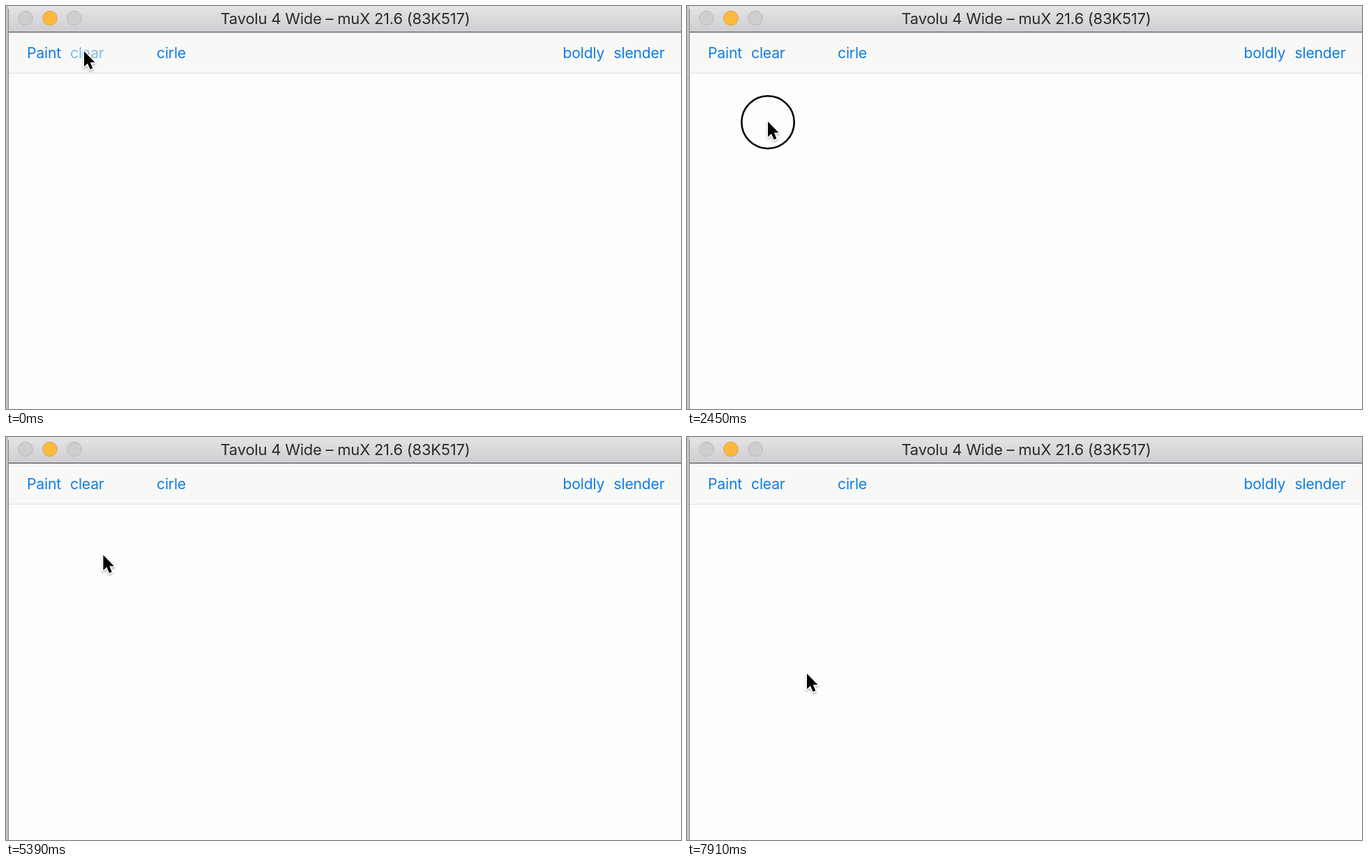
An HTML page for the animation above (8 s loop, 968 by 579 pixels).

```html
<!DOCTYPE html>
<html lang="en">
<head>
<meta charset="utf-8">
<title>Circle drawing</title>
<style>
  html, body { margin: 0; width: 100%; height: 100%; overflow: hidden; background: #fdfdfb; }
  svg { display: block; width: 968px; height: 579px; }
  text { font: 21.2px Inter, Roboto, sans-serif; letter-spacing: -0.01em; }
  .title { font-size: 22px; fill: #2b292c; }
  .buttons { fill: #117ce2; }
  .lights circle { fill: #cfcdd0; stroke: #b8b6b9; }
  .lights .amber { fill: #fdb93d; stroke: #dda137; }
</style>
</head>
<body>
<svg viewBox="0 0 968 579">
  <defs>
    <linearGradient id="bar" x2="0" y2="1">
      <stop stop-color="#e5e4e5"/>
      <stop offset="1" stop-color="#cfcdd0"/>
    </linearGradient>
    <filter id="shadow" x="-50%" y="-50%" width="200%" height="200%">
      <feDropShadow dx="0" dy="2" stdDeviation="1.5" flood-opacity=".3"/>
    </filter>
  </defs>

  <rect width="968" height="579" fill="#fdfdfb"/>
  <rect y="38" width="968" height="58" fill="#f8f9f7"/>
  <rect y="96" width="968" height="1" fill="#dcdce2"/>
  <rect width="968" height="37" fill="url(#bar)"/>
  <rect x="3" y="37" width="965" height="1" fill="#3b3945"/>
  <rect width="3" height="579" fill="#c3c4c2"/>
  <rect x="3" y="4" width="1" height="575" fill="#858585"/>

  <g class="lights">
    <circle cx="28" cy="17.5" r="10.3"/>
    <circle class="amber" cx="63" cy="17.5" r="10.3"/>
    <circle cx="98" cy="17.5" r="10.3"/>
  </g>
  <text class="title" x="486.5" y="26" text-anchor="middle">Tavolu 4 Wide – muX 21.6 (83K517)</text>

  <g class="buttons">
    <text x="30" y="74.5">Paint</text>
    <text id="clear" x="92" y="74.5">clear</text>
    <text x="216" y="74.5">cirle</text>
    <text x="798.5" y="74.5">boldly</text>
    <text x="944.5" y="74.5" text-anchor="end">slender</text>
  </g>

  <circle id="ring" r="37.7" fill="none" stroke="#050505" stroke-width="2.6"/>
  <path id="cursor" d="M0-1v22l5-4.6 3.6 8.6 3.8-1.6-3.5-8.4h6.6z" fill="#000"
        stroke="#fff" stroke-width="3" paint-order="stroke" stroke-linejoin="round" filter="url(#shadow)"/>
</svg>
<script>
  const LOOP = 8000;
  const [clear, ring, cursor] = ["clear", "ring", "cursor"].map(id => document.getElementById(id));

  // Eased progress from 0 to 1 between two times
  function progress(t, start, end) {
    const u = Math.min(1, Math.max(0, (t - start) / (end - start)));
    return u * u * (3 - 2 * u);
  }

  // The pointer leaves the button, draws twice, then drifts down in two strokes
  function pointerAt(t) {
    const toCanvas = progress(t, 120, 600);
    const release = progress(t, 3600, 3800);
    const toSecond = progress(t, 5150, 5600);
    const down = progress(t, 6450, 6920);
    const further = progress(t, 7030, 7400);
    const settle = progress(t, 7600, 7880);
    return {
      x: 112 + 4 * toCanvas - 2 * release + 46 * toSecond + 12 * settle,
      y: 66 + 101 * toCanvas - release + 8 * toSecond + 144 * down + 35 * further - 12 * settle
    };
  }

  const presses = [{ start: 660, end: 3760 }, { start: 5700, end: 6260 }];

  function moveTo(shape, { x, y }) {
    shape.setAttribute("transform", `translate(${x} ${y})`);
  }

  function draw(t) {
    moveTo(cursor, pointerAt(t));
    clear.setAttribute("opacity", 0.5 + 0.5 * progress(t, 30, 280));

    // A ring stays where the press began until it is released
    const press = presses.find(({ start, end }) => t >= start && t < end);
    ring.setAttribute("visibility", press ? "visible" : "hidden");
    if (press) moveTo(ring, pointerAt(press.start));
  }

  const begin = performance.now();
  function tick() {
    draw((performance.now() - begin) % LOOP);
    requestAnimationFrame(tick);
  }
  tick();
</script>
</body>
</html>
```
